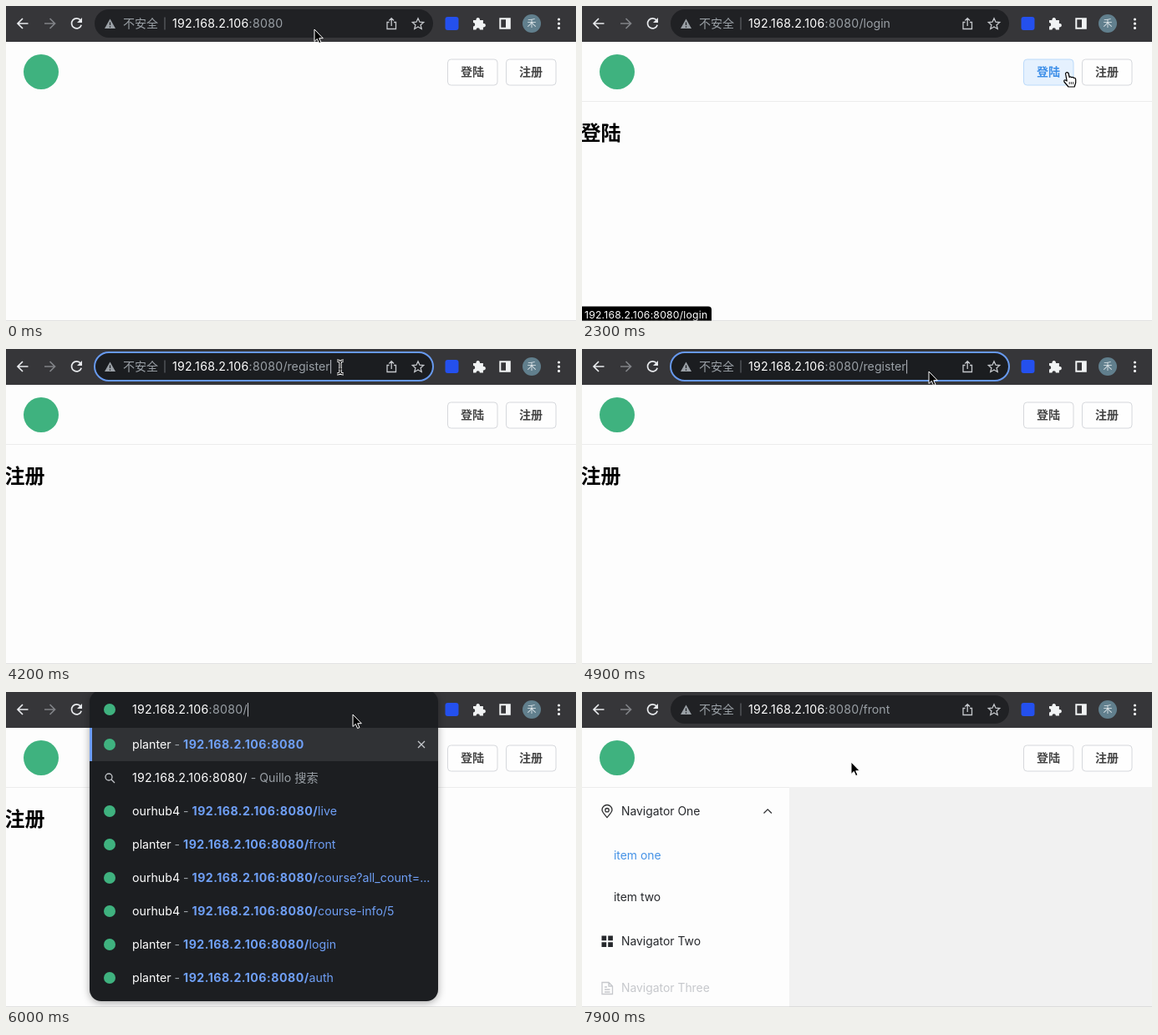
An HTML page for the animation above (8000 ms loop, 682x378 px).

```html
<!DOCTYPE html>
<html lang="zh">
<head>
<meta charset="utf-8">
<style>
  html, body { margin: 0; width: 100%; height: 100%; overflow: hidden; background: #fdfdfd; }
  svg { display: block; width: 100%; height: 100%; }
  text { font: 14.2px Inter, "Noto Sans CJK SC", "Noto Sans CJK", sans-serif; white-space: pre; fill: #fff; }
  .line { fill: none; stroke: #e8eaed; stroke-width: 1.7; }
  .dim { fill: #9aa0a6; }
  .num { letter-spacing: .018em; }
  .btn rect { fill: #fefefe; stroke: #d6d8dc; }
  .btn text { fill: #444; font-size: 14px; font-weight: 700; text-anchor: middle; }
  .btn.on rect { fill: #e5f1fe; stroke: #bbdafa; }
  .btn.on text { fill: #3c8ee8; }
  #side text { font-size: 13.9px; fill: #26282c; }
  #side .line { stroke: #303133; stroke-width: 1.3; }
  #drop { filter: drop-shadow(0 2px 5px #0005); }
  #drop .line { stroke: #c4c7cb; stroke-width: 1.3; }
  #drop .link { fill: #6f9ff5; }
  #drop .bold { font-weight: 700; letter-spacing: .032em; }
</style>
</head>
<body>
<svg viewBox="0 0 682 378" preserveAspectRatio="none">
  <defs><path id="ibeam" d="M-4-8Q0-8 0-5Q0-8 4-8M0-5V5M-4 8Q0 8 0 5Q0 8 4 8M-2 2H2"/></defs>
  <rect width="682" height="378" fill="#fdfdfd"/>
  <path id="rule" d="M0 114.5H682" stroke="#ececec"/>
  <circle cx="42" cy="79" r="21" fill="#3fb27f"/>
  <g class="btn" id="login"><rect x="528.5" y="64" width="59.5" height="31" rx="4"/><text x="558" y="84">登陆</text></g>
  <g class="btn" id="register"><rect x="598.5" y="64" width="59.5" height="31" rx="4"/><text x="628" y="84">注册</text></g>
  <text id="head" x="-1.5" y="161" style="font-size:24px;font-weight:700;fill:#000"></text>

  <g id="side">
    <rect x="248" y="114" width="434" height="264" fill="#f1f1f1"/>
    <path class="line" d="M30 150.5C26 146 24 144 24 141.5a6 6 0 0 1 12 0C36 144 34 146 30 150.5Z"/>
    <circle class="line" cx="30" cy="141.7" r="2.2"/>
    <path class="line" d="M217.5 145.5l4.7-4.7 4.7 4.7"/>
    <path d="M23.5 292.5h5.7v5.7h-5.7zM31.2 292.5h5.7v5.7h-5.7zM23.5 300.3h5.7v5.7h-5.7zM31.2 300.3h5.7v5.7h-5.7z" fill="#26282c"/>
    <path class="line" style="stroke:#c6c8cc" d="M24 348.5h8l4.5 4.5v9.5H24zM32 348.5v4.5h4.5M27 354h3M27 357h6.5M27 360h6.5"/>
    <text x="47" y="148">Navigator One</text>
    <text x="38" y="201" style="fill:#4592e6">item one</text>
    <text x="38" y="251">item two</text>
    <text x="47" y="304">Navigator Two</text>
    <text x="47" y="360" style="fill:#c6c8cc">Navigator Three</text>
  </g>

  <g id="status">
    <path d="M0 360.5H151a4 4 0 0 1 4 4V378H0z"/>
    <text class="num" x="3" y="375" style="font-size:12.2px">192.168.2.106:8080/login</text>
  </g>
  <path d="M0 377.7H682" stroke="#c4c4c4" stroke-width=".6"/>

  <rect width="682" height="43" fill="#363639"/>
  <path class="line" d="M26.5 21H14.5M20 15l-6 6 6 6"/>
  <path class="line" style="stroke:#818387" d="M46 21H58M52.5 15l6 6-6 6"/>
  <path class="line" d="M89.3 17.3a6 6 0 1 0 .9 5.4"/>
  <path d="M91 14v6h-6z" fill="#e8eaed"/>
  <rect id="pill" x="106" y="4" width="405" height="34" rx="17" stroke-width="2"/>
  <g id="info">
    <path d="M124.5 15.5l6.5 11.5h-13z" fill="#9aa0a6"/>
    <path d="M124.5 19.5v3.5M124.5 24.2v1.5" stroke="#202124" stroke-width="1.3"/>
    <text class="dim" x="140" y="26" style="font-size:14px">不安全</text>
    <path d="M190 13.5v15" stroke="#6b6e73"/>
    <g class="line" style="stroke:#c4c7cb;stroke-width:1.3">
      <path d="M458.5 19.5h-2.5v8h10.5v-8h-2.5M461.2 24v-9M458.3 17.5l2.9-2.9 2.9 2.9"/>
      <path d="M493 14.8l2 4.4 4.7.4-3.6 3.2 1.1 4.7-4.2-2.5-4.2 2.5 1.1-4.7-3.6-3.2 4.7-.4z"/>
    </g>
  </g>
  <rect x="525.5" y="13" width="16" height="16" rx="3" fill="#2450ee"/>
  <path d="M559 17h3.5a2.3 2.3 0 1 1 4.4 0h4v4a2.3 2.3 0 1 1 0 4.4v3.1h-4a2.2 2.2 0 0 0-4.4 0H559v-4a2.2 2.2 0 0 0 0-4.4z" fill="#f1f3f4"/>
  <path d="M591.3 15.3h11.5v11.5h-11.5z" fill="none" stroke="#f1f3f4" stroke-width="2"/>
  <path d="M598 15h5v12h-5z" fill="#f1f3f4"/>
  <circle cx="629" cy="21" r="11" fill="#617f8d"/>
  <text x="629" y="25" text-anchor="middle" style="font-size:11px;fill:#dfe7ea">禾</text>
  <path d="M661.5 16v0M661.5 21.2v0M661.5 26.4v0" stroke="#f1f3f4" stroke-width="3.2" stroke-linecap="round"/>

  <g id="drop"></g>
  <rect id="sel" y="12" height="19" fill="#3f639f"/>
  <text id="url" y="26"></text>
  <path id="caret" d="M0 13v16.5" stroke="#bdc1c6"/>

  <g id="cursor" stroke-linejoin="round">
    <path id="arrow" d="M0 0V14.5L3.3 11.4 5.6 16.6 8 15.6 5.7 10.7H10.3Z" fill="#000" stroke="#fff"/>
    <g id="beam" fill="none">
      <use href="#ibeam" stroke="#fff" stroke-width="3.2"/>
      <use href="#ibeam" stroke="#000" stroke-width="1.2"/>
    </g>
    <g id="hand" stroke="#000" stroke-width="1.2">
      <path d="M-2.5 1Q-1-1.5 1 .5L2.2 5.5Q4 4.3 4.8 5.8Q6.5 4.8 7.3 6.4Q9.300 5.8 9.700 8V12L8.200 17H1L-4 11Q-5 8.500-2.500 9L-.800 10Z" fill="#fff"/>
      <path d="M2.200 11v3M4.400 11v3M6.600 11v3" stroke-width=".8"/>
    </g>
  </g>
</svg>
<script>
const LOOP = 8000, HOST = '192.168.2.106', ADDR = HOST + ':8080';
const $ = id => document.getElementById(id);
const show = (id, on) => $(id).style.display = on ? '' : 'none';
const span = (cls, s) => `<tspan class="${cls}">${s}</tspan>`;

// Pointer path: time, x, y
const path = [[0, 369, 28], [400, 383, 26], [1200, 383, 26], [1700, 575, 82], [2200, 581, 80],
  [2400, 581, 80], [2650, 632, 80], [3000, 632, 80], [3600, 390, 9], [3750, 390, 9],
  [4100, 400, 22], [4300, 400, 22], [4600, 415, 27], [7300, 415, 27], [7800, 322, 84], [LOOP, 322, 84]];

function pointer(t) {
  const i = path.findIndex(p => p[0] > t), [t0, x0, y0] = path[i - 1], [t1, x1, y1] = path[i];
  const k = (t - t0) / (t1 - t0), e = k * k * (3 - 2 * k);
  return [x0 + (x1 - x0) * e, y0 + (y1 - y0) * e];
}

const SEARCH = null, A = 'planter', B = 'ourhub4';
const menus = {
  all: [[A, ''], SEARCH, [B, 'live'], [A, 'front'], [B, 'course?all_count=...'], [B, 'course-info/5'], [A, 'login'], [A, 'auth']],
  register: [[A, 'register'], SEARCH, [A, 'login'], [A, 'auth']],
  front: [[A, 'front'], SEARCH]
};

function menuRow(row, i, typed) {
  const y = 63 + i * 40;
  if (!row) return `<circle class="line" cx="123" cy="${y - 1}" r="4"/><path class="line" d="M126 ${y + 2}l4 4"/>
    <text x="151" y="${y + 5}">${span('num', ADDR + '/')}${typed}${span('dim', ' - Quillo 搜索')}</text>`;
  const [site, page] = row, match = page.startsWith(typed) ? typed : '';
  return `<circle cx="124" cy="${y}" r="7" fill="#3fb27f"/><text x="151" y="${y + 5}">${site}${span('dim', ' - ')}` +
    span('link bold', ADDR + (page && '/' + match)) + span('link', page.slice(match.length)) + '</text>';
}

let drawn;
function drawMenu(name, typed) {
  const key = name + typed;
  if (key === drawn) return;
  drawn = key;
  const rows = menus[name], bottom = 51 + rows.length * 40;
  $('drop').innerHTML = `<rect x="100" y="-2" width="417" height="${bottom + 2}" rx="14" fill="#1c1e21"/>
    <path d="M100 43H517V83H100z" fill="#303235"/><path d="M100 43h3v40h-3z" fill="#6c9df5"/>
    <path class="line" d="M493 59l8 8M501 59l-8 8"/>
    <circle cx="124" cy="21" r="7" fill="#3fb27f"/>` + rows.map((r, i) => menuRow(r, i, typed)).join('');
}

// Page part of the address: typed text, inline completion, open menu
function address(t) {
  if (t < 1900) return ['', '', ''];
  if (t < 2900) return ['/login', '', ''];
  if (t < 5000) return ['/register', '', ''];
  if (t < 6500) {
    const typed = 'register'.slice(0, Math.max(0, 7 - Math.floor((t - 5000) / 90)));
    return ['/' + typed, '', typed ? 'register' : 'all'];
  }
  if (t >= 7300) return ['/front', '', ''];
  const n = Math.min(5, 1 + Math.floor((t - 6500) / 170));
  return ['/' + 'front'.slice(0, n), 'front'.slice(n), 'front'];
}

let lastUrl;
function draw(t) {
  const [page, rest, menu] = address(t), x = menu ? 151 : 199;
  const focus = t >= 500 && t < 1800 || t >= 4200 && t < 7300;
  const loaded = t >= 7500;

  show('rule', t >= 100);
  show('side', loaded);
  show('head', t >= 1900 && !loaded);
  $('head').textContent = t < 2900 ? '登陆' : '注册';
  show('status', t >= 1900 && t < 3950);
  $('status').style.opacity = Math.min(1, (3950 - t) / 300);

  $('pill').setAttribute('fill', focus ? '#1b1d20' : '#202124');
  $('pill').setAttribute('stroke', focus ? '#6799ee' : 'none');
  show('info', !menu);
  show('drop', menu);
  if (menu) drawMenu(menu, page.slice(1));

  const url = $('url'), html = span('num', HOST) + span('dim num', ':8080') + span('dim', page + rest);
  if (html !== lastUrl) url.innerHTML = lastUrl = html;
  url.setAttribute('x', x);
  const end = x + url.getSubStringLength(0, (ADDR + page).length);
  show('sel', rest);
  $('sel').setAttribute('x', end);
  $('sel').setAttribute('width', rest ? x + url.getComputedTextLength() - end : 0);
  $('caret').setAttribute('transform', `translate(${end + 1})`);
  show('caret', focus && !rest && (t > 5000 && t < 6000 || Math.floor((t + 250) / 500) % 2 === 0));

  const [px, py] = pointer(t);
  const over = left => px >= left && px <= left + 60 && py >= 64 && py <= 95;
  const hot = { login: over(528), register: over(598) };
  const kind = hot.login || hot.register ? 'hand'
    : t > 200 && t < 4500 && py < 39 && px > 106 && px < 511 ? 'beam' : 'arrow';
  for (const k of ['arrow', 'beam', 'hand']) show(k, k === kind);
  $('cursor').setAttribute('transform', `translate(${px} ${py})`);
  $('login').classList.toggle('on', hot.login || t >= 1800 && t < 2900);
  $('register').classList.toggle('on', hot.register || t >= 2900 && t < 4200);
}

function tick() {
  draw(performance.now() % LOOP);
  requestAnimationFrame(tick);
}
tick();
</script>
</body>
</html>
```
